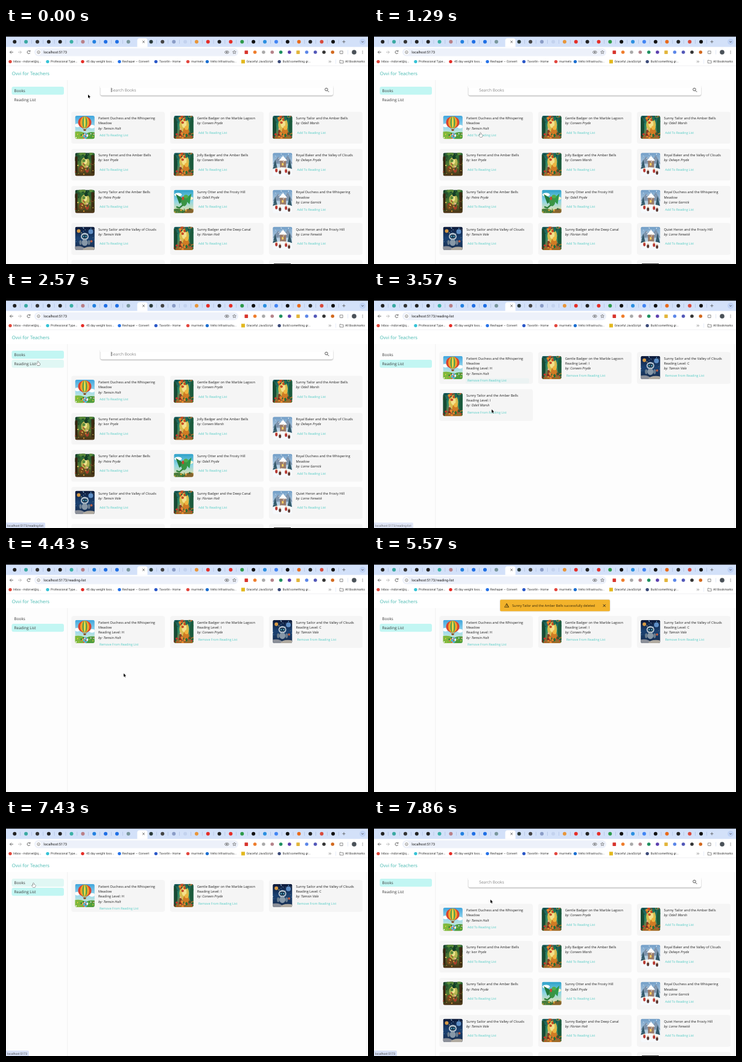
An HTML page with a canvas for the animation above (8 s loop, 600x390 px).

```html
<!DOCTYPE html>
<html lang="en">
<head>
<meta charset="utf-8">
<title>Reading list</title>
<style>
html, body { margin: 0; width: 100%; height: 100%; overflow: hidden; background: #fff; }
canvas { display: block; width: 600px; height: 390px; }
</style>
</head>
<body>
<canvas id="stage"></canvas>
<script>
const LOOP = 8000, TAU = Math.PI * 2;
const UI = '"Open Sans", "Noto Sans", sans-serif', CHROME = 'Roboto, Inter, sans-serif';
const canvas = document.getElementById('stage'), c = canvas.getContext('2d');
const dpr = window.devicePixelRatio || 1;
canvas.width = 600 * dpr;
canvas.height = 390 * dpr;

// ---- drawing helpers ----
function box(x, y, w, h, fill, r = 0) {
  c.fillStyle = fill;
  c.beginPath();
  c.roundRect(x, y, w, h, r);
  c.fill();
}
function oval(fill, x, y, rx, ry = rx) {
  c.fillStyle = fill;
  c.beginPath();
  c.ellipse(x, y, rx, ry, 0, 0, TAU);
  c.fill();
}
function ring(x, y, r, stroke, w = .7, from = 0, to = TAU) {
  c.strokeStyle = stroke;
  c.lineWidth = w;
  c.beginPath();
  c.arc(x, y, r, from, to);
  c.stroke();
}
function line(stroke, w, ...p) {
  c.strokeStyle = stroke;
  c.lineWidth = w;
  c.beginPath();
  for (let i = 0; i < p.length; i += 2) c.lineTo(p[i], p[i + 1]);
  c.stroke();
}
function poly(fill, ...p) {
  c.fillStyle = fill;
  c.beginPath();
  for (let i = 0; i < p.length; i += 2) c.lineTo(p[i], p[i + 1]);
  c.fill();
}
// y is the middle of the capitals
function text(s, x, y, size, fill, font = UI, style = '') {
  c.font = `${style} ${size}px ${font}`;
  c.fillStyle = fill;
  c.fillText(s, x, y + size * .35);
}
function sky(...stops) {
  const g = c.createLinearGradient(0, 0, 0, 38);
  stops.forEach((s, i) => g.addColorStop(i / (stops.length - 1), s));
  box(0, 0, 32.5, 38.5, g);
}
const noise = n => { const v = Math.sin(n * 12.9898) * 43758.5453; return v - Math.floor(v); };
function dots(colors, n, y0, y1, size) {
  for (let i = 1; i <= n; i++)
    oval(colors[i % colors.length], noise(i) * 32, y0 + noise(i + 50) * (y1 - y0), size * (.5 + noise(i + 90)));
}

// ---- book covers, 32 x 38 ----
const covers = {
  balloon() {
    sky('#3fa5dc', '#9bd9ee', '#e9f2c0');
    oval('#fff', 4, 16, 5, 3); oval('#fff', 28, 18, 5, 3);
    oval('#d9432f', 16, 11, 11, 10); oval('#f2a52b', 16, 11, 7.5, 10);
    oval('#4fa04a', 16, 11, 4, 10); oval('#f7d545', 16, 11, 1.6, 10);
    line('#8a5a2a', .5, 11, 18, 14, 23, 18, 23, 21, 18);
    box(14, 22, 4, 3, '#8a4f22', 1);
    oval('#7fb83d', 5, 33, 14, 7); oval('#4f9d3c', 28, 34, 13, 7);
    oval('#55b5d8', 17, 33, 4, 5);
    dots(['#f4d53b', '#e9634a', '#fff', '#2f7f35'], 26, 29, 38, 1);
  },
  jungle() {
    sky('#15595a', '#2f8b68', '#a66a24');
    oval('#d9bd4e', 17, 15, 8, 12); oval('#f5e18a', 17, 13, 4, 7);
    dots(['#0f4d46', '#c74a26', '#1d7550', '#e08a2c'], 30, 0, 13, 1.7);
    oval('#174a34', 1, 20, 5, 17); oval('#1b5a3c', 31, 18, 5, 16);
    oval('#d07b24', 20, 26, 5, 7); oval('#efb540', 21, 20, 3.2, 3.5);
    oval('#8a3f22', 11, 27, 2, 4); oval('#e9b68c', 11, 22, 1.6);
    dots(['#c9362b', '#e8862f', '#276a34', '#7a2b1e'], 30, 29, 38, 1.6);
  },
  forest() {
    sky('#123c2b', '#4d7a34', '#4b3216');
    oval('#b4b650', 17, 16, 7, 9); oval('#eee38b', 17, 14, 3, 5);
    dots(['#143d26', '#2f6a32', '#5a8a39'], 34, 0, 15, 2);
    box(0, 6, 4, 28, '#35230f'); box(27, 4, 5, 30, '#3d2a12');
    oval('#744a20', 11, 27, 5, 6); oval('#a6402b', 20, 28, 3, 5); oval('#e3b488', 20, 23, 1.8);
    dots(['#f2d65c', '#e59b36', '#2f5b28', '#b9472f'], 28, 17, 38, .9);
  },
  snow() {
    sky('#6f9cc6', '#b3cde2', '#eef4f8');
    poly('#7d93ac', 0, 18, 9, 6, 17, 16, 25, 4, 33, 18);
    box(12, 12, 10, 13, '#9a7a68'); poly('#fff', 10, 13, 17, 5, 24, 13);
    box(15, 17, 3, 4, '#f6cf62');
    poly('#33596a', 0, 27, 4, 11, 8, 27); poly('#33596a', 24, 27, 28, 10, 32, 27);
    oval('#f6f9fc', 16, 33, 22, 9);
    [[6, 29], [12, 32], [22, 30], [27, 33]].forEach(([x, y], i) => {
      oval(i % 2 ? '#5b3a34' : '#b73a33', x, y, 2, 3.2); oval('#e8bb98', x, y - 3.3, 1.2);
    });
    dots(['#fff'], 26, 0, 28, .5);
  },
  dragon() {
    sky('#2ba0c9', '#8fd6e3', '#f0e2a2');
    oval('#fff', 7, 8, 6, 3); oval('#f7f2d2', 26, 14, 6, 3);
    poly('#227a3c', 3, 7, 18, 16, 9, 23); poly('#2f9a49', 29, 6, 18, 16, 26, 24);
    oval('#3a9443', 17, 19, 5, 8); oval('#52ad4d', 20, 11, 3.5, 3);
    line('#2d7f3a', 2.4, 15, 25, 9, 30, 4, 28);
    oval('#c8442f', 15, 14, 1.8, 3);
    oval('#487b3a', 6, 37, 12, 6); oval('#86642e', 27, 37, 10, 6);
    dots(['#e7a735', '#2b6a35'], 12, 31, 38, 1);
  },
  space() {
    sky('#0b1838', '#1b4272', '#162b4c');
    dots(['#fff', '#f3d77a', '#74b7e4'], 30, 0, 30, .5);
    oval('#d69a45', 6, 7, 3); oval('#5d8dc4', 26, 8, 4); oval('#b75d46', 27, 24, 2);
    oval('#b9c6d1', 16, 16, 6.5, 6); oval('#1c3852', 16, 16, 4.6, 3.4);
    oval('#62d0ec', 14, 16, 1); oval('#62d0ec', 18, 16, 1);
    oval('#8798a8', 16, 26, 5, 5.5); oval('#6c7f90', 9, 26, 2, 4); oval('#6c7f90', 23, 26, 2, 4);
    oval('#8b8f98', 5, 37, 11, 5); oval('#b0aaa0', 25, 38, 12, 5);
  }
};

// ---- books: title lines, author, cover, level ----
const book = (title, author, cover, level) => ({ title: title.split('|'), author, cover, level });
const balloonBook = book('Patient Duchess and the Whispering|Meadow', 'Tamsin Holt', 'balloon', 'H');
const badgerBook = book('Gentle Badger on the Marble Lagoon', 'Corwen Pryde', 'jungle', 'I');
const tailorBook = book('Sunny Tailor and the Amber Bells', 'Odell Marsh', 'jungle', 'I');
const sailorBook = book('Sunny Sailor and the Valley of Clouds', 'Tamsin Vale', 'space', 'C');
const library = [
  balloonBook, badgerBook, tailorBook,
  book('Sunny Ferret and the Amber Bells', 'Ivor Pryde', 'forest'),
  book('Jolly Badger and the Amber Bells', 'Corwen Marsh', 'jungle'),
  book('Royal Baker and the Valley of Clouds', 'Delwyn Pryde', 'snow'),
  book('Sunny Tailor and the Amber Bells', 'Petra Pryde', 'forest'),
  book('Sunny Otter and the Frosty Hill', 'Odell Pryde', 'dragon'),
  book('Royal Duchess and the Whispering|Meadow', 'Lorne Garrick', 'snow'),
  sailorBook,
  book('Sunny Badger and the Deep Canal', 'Florian Holt', 'jungle'),
  book('Quiet Heron and the Frosty Hill', 'Lorne Fenwick', 'snow')
];
const saved = [balloonBook, badgerBook, sailorBook, tailorBook];

let buttons;
function card(b, i, top, isSaved) {
  const x = 108.3 + i % 3 * 163.8, y = top + Math.floor(i / 3) * 61.2;
  box(x, y, 155, 52.5, '#f5f5f5', 3.5);
  c.save();
  c.translate(x + 6.2, y + 6.4);
  c.beginPath();
  c.roundRect(0, 0, 32.3, 38.3, 3);
  c.clip();
  covers[b.cover]();
  c.restore();
  const tx = x + 44.6;
  let ty = y + 10.4;
  const put = (s, style) => { text(s, tx, ty, 5.6, '#222', UI, style); ty += 8.3; };
  b.title.forEach(s => put(s));
  if (isSaved) put('Reading Level: ' + b.level);
  put('by: ' + b.author, 'italic');
  const by = Math.max(ty + 3.7, y + 34.3);
  text(isSaved ? 'Remove From Reading List' : 'Add To Reading List', tx + 2, by, 5.25, '#50cbc4');
  buttons.push([tx, by - 5, isSaved ? 68 : 52, 10]);
}

// ---- browser frame ----
const tabs = ['#222', '#3aa9a2', '#333', '#222', '#222', '#3bb0a5', '#b98088', '#2380e0', '#1f6fe5', '#1f6fe5', '#79979c', '',
  '#2a3a3a', '#444', '#8a9cc6', '#c3d2ee', '#e8963a', '#e52d27', '#222', '#e52d27', '#2d9a4a', '#111', '#2b8fe0', '#4285f4',
  '#111', '#e86a1a', '#222', '#d94a3c', '#111'];
const extensions = ['#d8342c', '#ef7d2c', '#a9a9a9', '#b5838a', '#1f8f5f', '#5b3fae', '#e2b53a', '#5b86e8', '#5157b8', '#333', '#d2691e'];
const bookmarks = [
  [7, 12, '#e0483c', 'Inbox - mdorvel@q...'], [69, 74, '#35c3d6', 'Professional Type...'],
  [127, 133, '#e52d27', '45 day weight loss...'], [188, 192.5, '#2672e8', 'Reshaper \u2013 Convert'],
  [248.5, 254, '#2b58c8', 'Tavorlin - Home'], [301.5, 307, '#e2473f', 'murmelo'],
  [333.5, 338.5, '#1c6fd0', 'Velto Infrastructu...'], [393, 398.5, '#e3b81f', 'Graceful JavaScript'],
  [453, 458.5, '#3b4a78', 'Build something gr...']
];

function browser(url) {
  box(0, 0, 600, 14.5, '#000');
  box(0, 14.5, 600, 17, '#d3e1f9');
  box(217.5, 17, 17, 14.5, '#fff', [4, 4, 0, 0]);
  tabs.forEach((fill, i) => {
    const x = 14.3 + i * 18.85;
    if (!fill) return;
    oval(fill, x, 22.7, 3);
    if (i !== 10) box(x + 9, 19.5, .6, 6.5, '#a5b8dc');
  });
  line('#333', .7, 226.2, 21, 229.8, 24.6);
  line('#333', .7, 226.2, 24.6, 229.8, 21);
  line('#444', .7, 557.5, 22.7, 562.5, 22.7);
  line('#444', .7, 560, 20.2, 560, 25.2);
  oval('#bfd2f5', 591, 22.7, 5);
  line('#333', .8, 589.3, 22, 591, 23.7, 592.7, 22);

  box(0, 31.5, 600, 31, '#fff');
  line('#444', .8, 12, 40, 6.5, 40, 9, 37.5);
  line('#444', .8, 6.5, 40, 9, 42.5);
  line('#aaa', .8, 20, 40, 25.5, 40, 23, 37.5);
  line('#aaa', .8, 25.5, 40, 23, 42.5);
  ring(37.5, 40, 2.4, '#444', .8, .3, 5.3);
  poly('#444', 38, 38.9, 40.3, 36.6, 40.3, 38.9);
  box(47, 33.5, 338, 13, '#edf1fa', 6.5);
  oval('#fff', 54, 40, 4.4);
  ring(54, 40, 2.3, '#444', .6);
  box(53.7, 39.6, .6, 1.7, '#444');
  text(url, 62.3, 40, 5.9, '#222', CHROME);
  c.strokeStyle = '#444'; c.lineWidth = .7;
  c.beginPath(); c.ellipse(366, 40, 3.3, 2.1, 0, 0, TAU); c.stroke();
  oval('#444', 366, 40, 1);
  const star = [];
  for (let i = 0; i <= 10; i++) {
    const a = i * Math.PI / 5 - Math.PI / 2, r = i % 2 ? 1.4 : 3;
    star.push(378.5 + Math.cos(a) * r, 40 + Math.sin(a) * r);
  }
  line('#444', .6, ...star);
  extensions.forEach((fill, i) => i === 0 || i === 6
    ? box(395.5 + i * 14.3, 37.3, 5.6, 5.6, fill, .6)
    : oval(fill, 398.3 + i * 14.3, 40, 2.8));
  c.strokeRect(553.7, 38, 4.4, 4.4);
  box(566.5, 36.5, .6, 7, '#ccd8ee');
  oval('#4a5158', 577, 40, 3.8);
  for (let i = -1; i < 2; i++) oval('#444', 591, 40 + i * 2, .6);

  bookmarks.forEach(([ix, tx, fill, s], i) => {
    if (i === 7) box(ix - 3, 52.5, 6, 6, fill);
    else oval(fill, ix, 55.6, 2.7);
    text(s, tx, 55.6, 5.1, '#333', CHROME);
  });
  for (const x of [535, 537.2]) line('#444', .6, x, 54, x + 1.6, 55.6, x, 57.2);
  box(546.5, 52, .6, 7, '#d6e0f4');
  line('#444', .6, 553.3, 53.3, 555.3, 53.3, 556, 54.2, 559.2, 54.2, 559.2, 58, 553.3, 58, 553.3, 53.3);
  text('All Bookmarks', 562, 55.6, 5.1, '#333', CHROME);
  box(0, 62.2, 600, .6, '#e6e8ec');
}

// ---- page parts ----
function shell(onList, mouse) {
  box(0, 62, 600, 328, '#fdfdfd');
  box(0, 62.5, 600, 23.5, '#fff');
  text('Ovvi for Teachers', 9.7, 75, 7.75, '#45b8b0');
  box(2.6, 86, .8, 304, '#f0f0f0');
  box(596.8, 86, .8, 304, '#f0f0f0');
  box(101.5, 86, .7, 304, '#ebebeb');
  ['Books', 'Reading List'].forEach((s, i) => {
    const y = 97 + i * 15, active = onList === (i === 1);
    const hover = mouse.x < 96 && mouse.y > y && mouse.y < y + 13.5;
    if (active || hover) box(9.5, y, 86.5, 13.3, active ? '#c2f6f3' : '#e0f7f4', 3);
    text(s, 13.6, y + 6.9, 6.4, '#383838');
    buttons.push([9.5, y, 86.5, 13.5]);
  });
}
function search(caret) {
  c.save();
  c.shadowColor = 'rgba(0,0,0,.35)';
  c.shadowBlur = 2 * dpr;
  c.shadowOffsetY = dpr;
  box(156.5, 94, 385.5, 17.5, '#fff', 3);
  c.restore();
  box(156, 91, 386.5, 8, '#fdfdfd');
  text('Search Books', 174.3, 102.4, 6.6, '#858585');
  if (caret) box(174, 98.7, .6, 7.2, '#222');
  ring(531, 101.6, 2.3, '#444', .9);
  line('#444', 1, 532.7, 103.3, 535.2, 105.8);
}
function toast(alpha) {
  if (alpha <= 0) return;
  c.save();
  c.globalAlpha = Math.min(1, alpha);
  c.shadowColor = 'rgba(0,0,0,.25)';
  c.shadowBlur = 2 * dpr;
  box(209, 72.3, 182, 19, '#f3b32b', 1.8);
  c.shadowColor = 'transparent';
  line('#33270a', .7, 219.8, 78.6, 223.2, 84.6, 216.4, 84.6, 219.8, 78.6, 223.2, 84.6);
  line('#33270a', .7, 219.8, 80.6, 219.8, 82.6);
  box(219.5, 83.1, .7, .7, '#33270a');
  text(tailorBook.title[0] + ' successfully deleted', 229, 82, 5.5, '#33270a');
  line('#222', .9, 379.6, 79.9, 383.8, 84.1);
  line('#222', .9, 379.6, 84.1, 383.8, 79.9);
  c.restore();
}
function status(s, w, alpha) {
  c.globalAlpha = alpha;
  box(0, 381, w, 9, '#d8e1f7', [0, 2, 0, 0]);
  text(s, 2, 385.8, 5.03, '#444', CHROME);
  c.globalAlpha = 1;
}

// ---- pointer ----
const path = [
  [0, 136, 110], [100, 136, 110], [1140, 176.5, 173], [1300, 176.5, 173], [2400, 53, 114.3], [2800, 53, 114.3],
  [3180, 165, 146], [3500, 195, 194], [4710, 195, 194], [5430, 300, 92], [5860, 300, 92], [6140, 155, 133],
  [6430, 193, 132], [6860, 193, 132], [7300, 45.5, 104], [7500, 45.5, 104], [7840, 193, 131.5], [LOOP, 193, 131.5]
];
function pointerAt(t) {
  const i = path.findIndex(k => k[0] > t), [t0, x0, y0] = path[i - 1], [t1, x1, y1] = path[i];
  let k = (t - t0) / (t1 - t0);
  k = k * k * (3 - 2 * k);
  return { x: x0 + (x1 - x0) * k, y: y0 + (y1 - y0) * k };
}
function pointer({ x, y }) {
  const hand = buttons.some(([bx, by, w, h]) => x > bx && x < bx + w && y > by && y < by + h);
  const p = new Path2D(hand
    ? 'M-.7 .5Q0-.4.7 .5V2.6L3 3.3Q3.6 3.6 3.4 4.8L2.7 7H-1L-2.8 4.2Q-2.6 3.2-1.5 3.9L-.7 4.6Z'
    : 'M0 0V5.6L1.3 4.4L2.2 6.4L3.1 6L2.2 4.1H4Z');
  c.save();
  c.translate(x, y);
  c.lineJoin = 'round';
  c.lineWidth = hand ? .7 : 1;
  c.strokeStyle = hand ? '#111' : '#fff';
  c.fillStyle = hand ? '#fff' : '#000';
  c.stroke(p);
  c.fill(p);
  c.restore();
}

function draw(t) {
  c.setTransform(dpr, 0, 0, dpr, 0, 0);
  c.textRendering = 'geometricPrecision';
  buttons = [];
  const mouse = pointerAt(t), onList = t >= 2800 && t < 7500, deleted = t >= 4430;
  shell(onList, mouse);
  if (onList) {
    saved.forEach((b, i) => { if (i < 3 || !deleted) card(b, i, 99.3, true); });
    if (t > 3150 && t < 3700) box(152, 142.6, 105, 8.6, 'rgba(80,203,196,.06)', 2);
  } else {
    search(t < 2800 && (t + 450) % 1000 < 500);
    library.forEach((b, i) => card(b, i, 138.6, false));
    for (let i = 0; i < 3; i++) box(108.3 + i * 163.8, 383.4, 155, 10, '#f5f5f5', 3.5);
    box(444, 389.2, 28, 1, '#222');
  }
  toast(Math.min((t - 4450) / 200, (6550 - t) / 200));
  browser('localhost:5173' + (t >= 2800 && t < 7400 ? '/reading-list' : ''));
  if (t >= 2400 && t < 3750) status('localhost:5173/reading-list', 65, Math.min(1, (3750 - t) / 250));
  if (t >= 7200) status('localhost:5173', 38, 1);
  if (t < 5430 || t >= 5860) pointer(mouse);
}
function tick(now) {
  draw(now % LOOP);
  requestAnimationFrame(tick);
}
draw(0);
requestAnimationFrame(tick);
</script>
</body>
</html>
```
